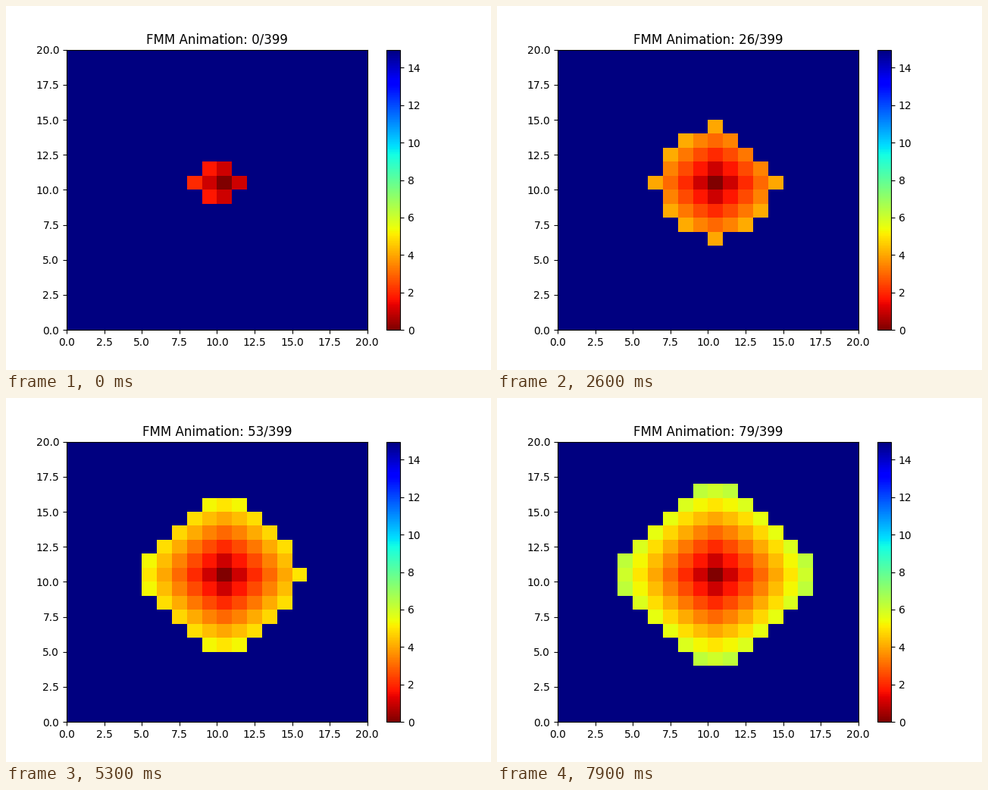
A matplotlib script for the animation above (8 s loop, 640 px wide and 480 px high).

```python
import numpy as np
import matplotlib.pyplot as plt
from matplotlib.animation import FuncAnimation

N = 20
SOURCE = (10, 10)
FRAMES = 80
STEPS = N * N - 1


def neighbours(x, y):
    for i, j in ((x - 1, y), (x + 1, y), (x, y - 1), (x, y + 1)):
        if 0 <= i < N and 0 <= j < N:
            yield i, j


def eikonal(t, x, y):
    """Upwind solution of |grad T| = 1 at one cell."""
    a = min(t[i, j] for i, j in neighbours(x, y) if j == y)
    b = min(t[i, j] for i, j in neighbours(x, y) if i == x)
    if np.isfinite(a) and np.isfinite(b) and abs(a - b) < 1:
        return (a + b + np.sqrt(2 - (a - b) ** 2)) / 2
    return min(a, b) + 1


def march():
    """Yield the arrival times after each accepted cell."""
    t = np.full((N, N), np.inf)
    t[SOURCE] = 0
    done, band = {SOURCE}, set(neighbours(*SOURCE))
    for cell in band:
        t[cell] = 1
    while band:
        # Ties go to the smallest x, then the smallest y
        cell = min(band, key=lambda c: (round(t[c], 9), c))
        band.remove(cell)
        done.add(cell)
        for n in neighbours(*cell):
            if n not in done:
                t[n] = min(t[n], eikonal(t, *n))
                band.add(n)
        yield t.copy()


states = list(march())
t_max = states[-1].max()

fig, ax = plt.subplots(figsize=(6.4, 4.8), dpi=100)
edges = np.arange(N + 1)
mesh = ax.pcolormesh(edges, edges, np.full((N, N), t_max),
                     cmap="jet_r", vmin=0, vmax=t_max)
fig.colorbar(mesh, ax=ax)
title = ax.set_title("")


def draw(k):
    mesh.set_array(np.minimum(states[k], t_max).T)
    title.set_text(f"FMM Animation: {k}/{STEPS}")
    return mesh, title


anim = FuncAnimation(fig, draw, frames=FRAMES, interval=100,
                     init_func=lambda: draw(0), repeat=True, repeat_delay=0)
plt.show()
```
